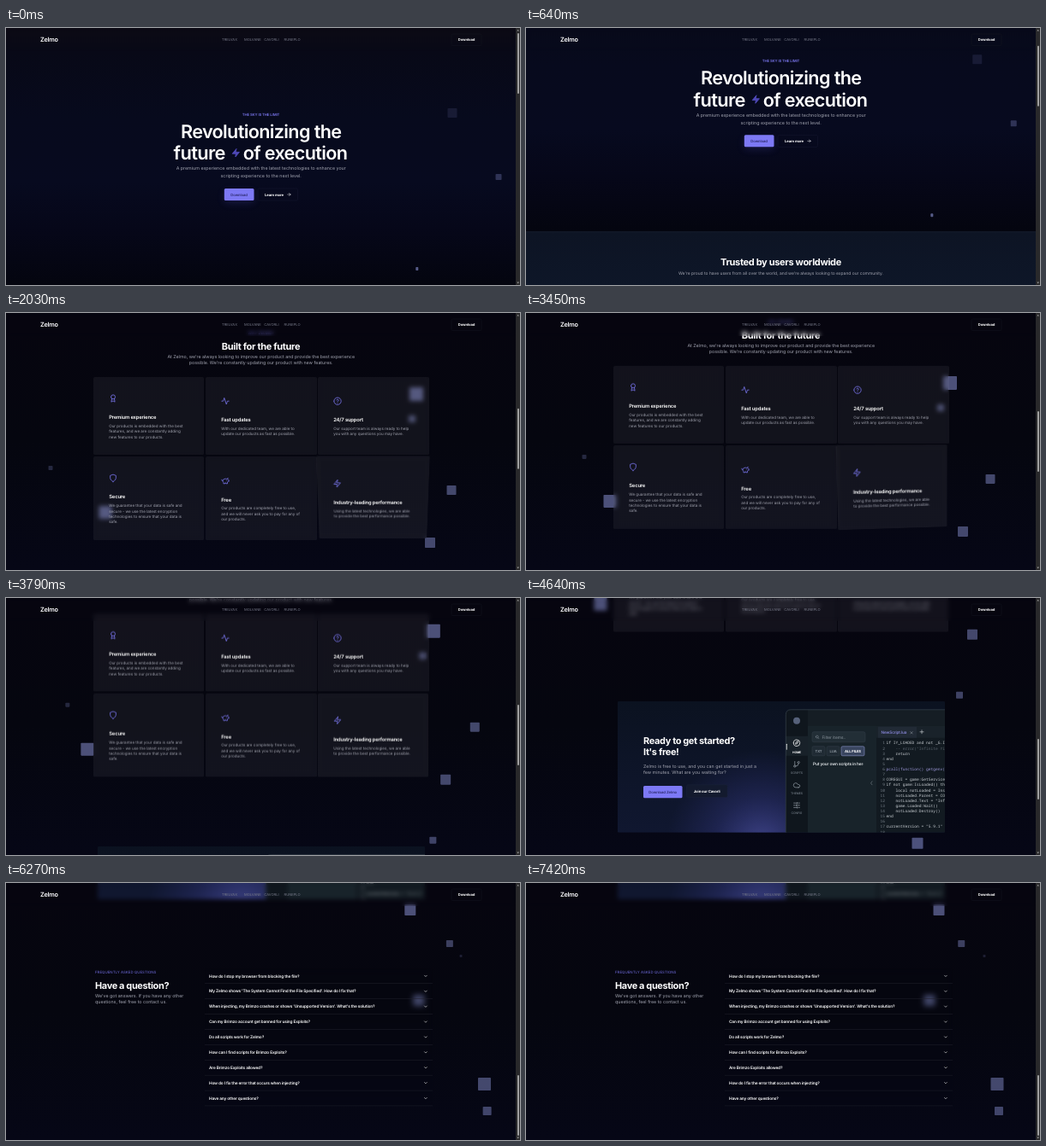
Write an HTML page that moves like this. It is 600 by 301 pixels and loops after 7.45 s.

```html
<!DOCTYPE html>
<html lang="en">
<head>
<meta charset="utf-8">
<title>Zelmo</title>
<style>
html, body { margin: 0; width: 100%; height: 100%; overflow: hidden; background: #05050f; }
#stage { position: relative; width: 600px; height: 301px; overflow: hidden; background: linear-gradient(#06050f, #05060f 50%, #060716); }
#page, #page > svg { position: absolute; left: 0; top: 0; width: 600px; height: 1234px; }
#page div { position: absolute; }
svg { display: block; overflow: visible; }
/* the minute turn switches glyphs to subpixel placement */
text { font-family: Inter, "Liberation Sans", sans-serif; white-space: pre; text-rendering: geometricPrecision; transform-box: fill-box; transform-origin: center; transform: rotate(.01deg); }
.display { letter-spacing: -.03em; }
.mono { font-family: "Noto Sans Mono", "DejaVu Sans Mono", monospace; }
.hero { top: 0; width: 600px; height: 301px; background: linear-gradient(#0c0a14, #080917 9%, #070a1d 35%, #070a1f 60%, #060719 78%, #04050f); }
.stats { top: 301px; width: 600px; height: 129px; box-sizing: border-box; background: linear-gradient(#0d1424, #0e1729 60%, #0d1728); border: solid #182135; border-width: .6px 0; }
.card { background: rgba(255, 255, 255, .055); border-radius: 1.5px; backdrop-filter: blur(2.5px); }
.faq { left: 232px; top: 1033px; width: 266px; height: 161px; backdrop-filter: blur(3px); }
#head { position: absolute; left: 0; top: 0; width: 595px; height: 27px; backdrop-filter: blur(2.5px); }
#head svg { width: 595px; height: 27px; }
#bar { position: absolute; left: 595px; top: 0; width: 5px; height: 301px; background: #29292b; }
#thumb { position: absolute; left: 1.7px; top: 6px; width: 2.3px; height: 70.5px; border-radius: 1.1px; background: #a0a0a0; }
</style>
</head>
<body>
<div id="stage">
  <div id="page"></div>
  <div id="head"></div>
  <div id="bar"><div id="thumb"></div></div>
</div>
<script>
const LOOP = 7450, MAX_SCROLL = 933;
const WHITE = '#fff', GREY = '#a2a4b0', INDIGO = '#7874ea', DARK = '#22205c';
const $ = id => document.getElementById(id);

// y is the middle of the capitals; heavier weights are set larger and tighter
const text = (x, y, size, fill, str, weight = 400, anchor = 'start', cls = '') => {
  if (weight >= 500) { size *= 1.05; cls = 'display'; }
  return `<text x="${x}" y="${y + size * .3635}" font-size="${size}" fill="${fill}" font-weight="${weight}" text-anchor="${anchor}" class="${cls}">${str}</text>`;
};
const mid = (x, y, size, fill, str, weight) => text(x, y, size, fill, str, weight, 'middle');
const rect = (x, y, w, h, fill, r = 0, stroke = 'none') =>
  `<rect x="${x}" y="${y}" width="${w}" height="${h}" rx="${r}" fill="${fill}" stroke="${stroke}" stroke-width=".5"/>`;
const path = (d, stroke, w = .6) =>
  `<path d="${d}" fill="none" stroke="${stroke}" stroke-width="${w}" stroke-linecap="round" stroke-linejoin="round"/>`;
// 24-unit icon centred on x, y
const icon = (x, y, size, d, stroke, fill = 'none') =>
  `<path transform="translate(${x - size / 2} ${y - size / 2}) scale(${size / 24})" d="${d}" fill="${fill}" stroke="${stroke}" stroke-width="2" stroke-linecap="round" stroke-linejoin="round"/>`;
const shift = (y, body) => `<g transform="translate(0 ${y})">${body}</g>`;

const ring = (x, y, r) => `M${x - r} ${y}a${r} ${r} 0 1 0 ${2 * r} 0a${r} ${r} 0 1 0 ${-2 * r} 0`;
const ICONS = {
  award: ring(12, 8, 6) + 'M15.5 13 17 22l-5-3-5 3 1.5-9',
  pulse: 'M22 12h-4l-3 9L9 3l-3 9H2',
  help: ring(12, 12, 10) + 'M9.1 9a3 3 0 0 1 5.8 1c0 2-3 3-3 3M12 17h.01',
  shield: 'M12 22s8-4 8-10V5l-8-3-8 3v7c0 6 8 10 8 10z',
  pig: 'M19 5c-1.5 0-2.8 1.4-3 2-3.5-1.5-11-.3-11 5 0 1.8 0 3 2 4.5V20h4v-2h3v2h4v-4c1-.5 1.7-1 2-2h2v-4h-2c0-1-.5-1.5-1-2zM2 9v1c0 1.1.9 2 2 2M16 11h.01',
  zap: 'M13 2 3 14h9l-1 8 10-12h-9z',
  compass: ring(12, 12, 10) + 'M16 8l-2 6-6 2 2-6z',
  branch: 'M6 3v12' + ring(18, 6, 3) + ring(6, 18, 3) + 'M18 9a9 9 0 0 1-9 9',
  cloud: 'M17.5 19H9a7 7 0 1 1 6.7-9h1.8a4.5 4.5 0 1 1 0 9z',
  sliders: 'M3 5h11M18 5h3M3 12h4M11 12h10M3 19h11M18 19h3M14 3v4M11 10v4M14 17v4',
  search: ring(11, 11, 7) + 'M16 16l5 5'
};

const hero = mid(297.5, 101, 4.1, INDIGO, 'THE SKY IS THE LIMIT', 600)
  + mid(297.7, 121, 20.6, WHITE, 'Revolutionizing the', 600)
  + text(195.6, 146.3, 20.8, WHITE, 'future', 600)
  + text(398.4, 146.3, 20.6, WHITE, 'of execution', 600, 'end')
  + icon(268.3, 146.3, 11, ICONS.zap, '#4f49b8', '#4f49b8')
  + mid(297.7, 164.3, 5.33, GREY, 'A premium experience embedded with the latest technologies to enhance your')
  + mid(297.7, 173.3, 5.33, GREY, 'scripting experience to the next level.')
  + `<g filter="url(#soft)" opacity=".2">${rect(254.8, 191, 34.7, 14, '#5a56d0', 3)}</g>`
  + rect(254.8, 188, 34.7, 14, '#7d79f5', 1.5) + mid(272, 195, 4.05, DARK, 'Download', 500)
  + rect(294, 188, 46.5, 14, 'none', 1.5, '#171930') + text(302, 195, 4, WHITE, 'Learn more', 700)
  + path('M328.8 195h3.4m-1.5-1.5 1.5 1.5-1.5 1.5', WHITE, .5);

const stats = mid(297.5, 87, 10.5, WHITE, 'Trusted by users worldwide', 700)
  + mid(297.5, 99.5, 4.95, GREY, "We're proud to have users from all over the world, and we're always looking to expand our community.")
  + [['10M+', 'Total downloads', 167], ['200K+', 'Cavorli members', 298], ['100M+', 'Times launched', 428.5]]
    .map(([n, label, x]) => mid(x, 128, 13.8, WHITE, n, 700) + mid(x, 145, 4.5, GREY, label)).join('');

const why = mid(297.5, 224, 4.5, '#5f5bc0', 'WHY <tspan fill="#7f7bea">ZELMO?</tspan>')
  + mid(297.5, 240, 10.5, WHITE, 'Built for the future', 700)
  + mid(297.7, 252.5, 5.3, GREY, "At Zelmo, we're always looking to improve our product and provide the best experience")
  + mid(297.7, 259.5, 5.3, GREY, "possible. We're constantly updating our product with new features.");

const CARDS = [
  ['award', 'Premium experience', 'Our products is embedded with the best|features, and we are constantly adding|new features to our products.'],
  ['pulse', 'Fast updates', 'With our dedicated team, we are able to|update our products as fast as possible.'],
  ['help', '24/7 support', 'Our support team is always ready to help|you with any questions you may have.'],
  ['shield', 'Secure', 'We guarantee that your data is safe and|secure - we use the latest encryption|technologies to ensure that your data is|safe.'],
  ['pig', 'Free', 'Our products are completely free to use,|and we will never ask you to pay for any of|our products.'],
  ['zap', 'Industry-leading performance', 'Using the latest technologies, we are able|to provide the best performance possible.']
];
const cardHtml = ([ico, title, desc], i) => {
  const row = i > 2 ? 1 : 0, x = 102 + (i % 3) * 131.2, y = row ? 619 : 526, h = row ? 98 : 91;
  const lines = desc.split('|'), top = h / 2 - 20.5 - (lines.length - 3) * 3.2;
  const body = icon(23, top, 10, ICONS[ico], INDIGO)
    + text(18.2, top + 22, 5.6, WHITE, title, 600)
    + lines.map((s, k) => text(18.2, top + 32.2 + k * 6.4, 4.55, GREY, s)).join('');
  return `<div class="card" id="card${i}" style="left:${x}px;top:${y}px;width:129.4px;height:${h}px"><svg width="129.4" height="${h}">${body}</svg></div>`;
};

const CODE = `if IY_LOADED and not _G.I
    -- error("Infinite Yi
    return
end

pcall(function() getgenv()

COREGUI = game:GetService
if not game:IsLoaded() th
    local notLoaded = Inst
    notLoaded.Parent = CO
    notLoaded.Text = "Inf
    game.Loaded:Wait()
    notLoaded:Destroy()
end

currentVersion = "5.9.1"
`.split('\n');
const codeFill = s => s.includes('--') ? '#59626c' : s.startsWith('pcall') ? '#9c97d8' : '#c9ced3';
const codeLines = CODE.map((s, i) => {
  const y = 170 + i * 6.125;
  return text(419, y, 4.5, '#78828b', i + 1, 400, 'end', 'mono') + text(420.5, y, 4.57, codeFill(s), s, 400, 'start', 'mono');
}).join('');
const SIDE = [['compass', 'HOME', 170, 180.5], ['branch', 'SCRIPTS', 195, 205], ['cloud', 'THEMES', 219.5, 228.5], ['sliders', 'CONFIG', 243, 252]];
const side = SIDE.map(([ico, label, y, ly], i) =>
  icon(316, y, 9, ICONS[ico], i ? '#8b959e' : WHITE) + mid(316, ly, 3.3, i ? '#727c86' : WHITE, label, i ? 500 : 700)).join('');
const chip = (x, w, label, on) => rect(x, 174, w, 11, on ? '#39455f' : '#202b34', 1.5, on ? '#9aa2dc' : '#34414b')
  + mid(x + w / 2, 179.5, 4, on ? WHITE : '#a6b0b8', label, on ? 700 : 500);

const editor = `<g clip-path="url(#win)">` + rect(303, 131, 186, 144, '#121a21')
  + rect(303, 131, 26, 144, '#0f161d') + rect(303, 162, 26, 23, '#182129')
  + rect(329, 131, 80, 144, '#18232a') + rect(329, 131, 160, 19, '#151d24')
  + rect(409, 150, 80, 14, '#19222a') + rect(411, 151, 45, 13, '#212a35')
  + `<circle cx="316" cy="144" r="4" fill="#56617a"/>` + rect(303.6, 171, 1, 7, WHITE, .5) + side
  + rect(334, 157, 62, 12, '#222e36', 2, '#34414b') + icon(340, 163, 5, ICONS.search, '#a6b0b8')
  + text(345.5, 163, 4.8, '#8d979f', 'Filter items..')
  + chip(334, 15, 'TXT') + chip(351, 15, 'LUA') + chip(368, 27, 'ALL FILES', true)
  + `<g clip-path="url(#list)">${text(335, 194, 4.6, '#e3e7ea', 'Put your own scripts in here', 600)}</g>`
  + path('M404 215l-1.5 2 1.5 2', '#8d979f', .5)
  + text(414.5, 158, 4.5, '#9290ea', 'NewScript.lua', 500)
  + path('M448.8 156.8l2.4 2.4m0-2.4-2.4 2.4', '#9aa3ab', .5) + path('M460 157h4m-2-2v4', '#d8dce0', .6)
  + codeLines + `</g>` + path('M303.3 275V137q0-6 6-6H489', '#37424c', .7);

const cta = `<g clip-path="url(#cta)">` + rect(107, 121, 382, 154, 'url(#navy)') + rect(107, 121, 382, 154, 'url(#glow)')
  + text(137, 167, 10.4, WHITE, 'Ready to get started?', 700) + text(137, 179.8, 10.4, WHITE, "It's free!", 700)
  + text(137, 197, 5.28, GREY, 'Zelmo is free to use, and you can get started in just a')
  + text(137, 204.3, 5.28, GREY, 'few minutes. What are you waiting for?')
  + rect(137, 220.3, 45.5, 14.2, '#7d79f5', 1.5) + mid(159.7, 227.4, 4.1, DARK, 'Download Zelmo', 500)
  + rect(187.5, 219, 47.5, 14.5, '#131a2e', 1.5, '#1b2338') + mid(211.2, 226.2, 4.1, WHITE, 'Join our Cavorli', 700)
  + editor + `</g>`;

const ASKED = ['How do I stop my browser from blocking the file?',
  "My Zelmo shows 'The System Cannot Find the File Specified'. How do I fix that?",
  "When injecting, my Brimzo crashes or shows 'Unsupported Version'. What's the solution?",
  'Can my Brimzo account get banned for using Exploits?', 'Do all scripts work for Zelmo?',
  'How can I find scripts for Brimzo Exploits?', 'Are Brimzo Exploits allowed?',
  'How do I fix the error that occurs when injecting?', 'Have any other questions?'];
const faq = text(104, 134, 4.4, '#6f6bdc', 'FREQUENTLY ASKED QUESTIONS')
  + text(104, 149.8, 10.4, WHITE, 'Have a question?', 700)
  + text(104, 162, 5.3, GREY, "We've got answers. If you have any other")
  + text(104, 169.5, 5.3, GREY, 'questions, feel free to contact us.')
  + ASKED.map((q, i) => {
    const y = 138.8 + i * 17.9;
    return text(237, y, 4.55, WHITE, q, 600) + path(`M488.5 ${y - .6}l1.4 1.4 1.4-1.4`, WHITE, .55)
      + rect(232, y + 8.7, 266, .5, '#20212c');
  }).join('');

const defs = `<defs>
  <linearGradient id="navy" x2="0" y2="1"><stop stop-color="#0b1220"/><stop offset="1" stop-color="#101730"/></linearGradient>
  <radialGradient id="glow" gradientUnits="userSpaceOnUse" cx="275" cy="288" r="110">
    <stop stop-color="#5559b0" stop-opacity=".68"/><stop offset=".5" stop-color="#4145a0" stop-opacity=".28"/><stop offset="1" stop-color="#393c90" stop-opacity="0"/>
  </radialGradient>
  <filter id="soft" x="-1" y="-2" width="3" height="5"><feGaussianBlur stdDeviation="5"/></filter>
  <clipPath id="cta"><rect x="107" y="121" width="382" height="154" rx="1.5"/></clipPath>
  <clipPath id="win"><rect x="303" y="131" width="210" height="170" rx="6"/></clipPath>
  <clipPath id="list"><rect x="334" y="188" width="59.5" height="12"/></clipPath>
</defs>`;

// drifting squares: page y, size, opacity, then [time, x] points
const SQUARES = [
  [99, 11, .13, [0, 521], [1000, 530]], [174, 7, .3, [0, 575], [1000, 566]],
  [282, 3.4, .6, [0, 480], [1180, 469]],
  [546, 16, .52, [1180, 466], [2030, 479], [3450, 495]],
  [575, 8, .46, [2030, 474], [3450, 484]], [658, 11, .46, [2030, 520], [3450, 542]],
  [720, 12, .46, [2030, 495], [3450, 510], [4640, 521]],
  [684, 15, .52, [2030, 116], [3450, 98], [4640, 87]],
  [632, 5, .24, [2030, 52], [3450, 68]], [791, 8, .42, [4640, 506], [5640, 515]],
  [964, 13, .52, [4640, 457], [5390, 464], [7420, 482]],
  [1004, 7.5, .4, [5390, 525], [7420, 508]], [1168, 15, .46, [5390, 565], [7420, 550]],
  [1200, 10, .44, [5390, 569], [7420, 552]], [1070, 13, .44, [5390, 490], [7420, 471]],
  [1018, 3, .18, [5390, 528], [7420, 535]]
];

$('page').innerHTML = '<div class="hero"></div><div class="stats"></div>'
  + SQUARES.map(([y, s, a]) => `<div class="sq" style="top:${y - s / 2}px;width:${s}px;height:${s}px;border-radius:.8px;background:rgba(142,150,216,${a})"></div>`).join('')
  + CARDS.map(cardHtml).join('') + '<div class="faq"></div>'
  + `<svg>${defs}${hero}${shift(250, stats + why)}${shift(677, cta)}${shift(903, faq)}</svg>`;

const NAV = [['TRELVAX', 252], ['MOLVANE', 278], ['CAVORLI', 301.3], ['RUNEPLO', 324.5]];
$('head').innerHTML = '<svg>' + text(40, 13.7, 6.9, WHITE, 'Zelmo', 600)
  + NAV.map(([s, x]) => text(x, 13.8, 4.1, '#767988', s)).join('')
  + rect(520, 7, 35, 13.6, 'none', 1.5, '#171823') + mid(537.6, 13.7, 4, WHITE, 'Download', 700) + '</svg>';
$('bar').insertAdjacentHTML('beforeend', '<svg width="5" height="301"><path d="M1.5 3.6h2.4L2.7 1.8zM1.5 297.6h2.4l-1.2 1.8z" fill="#a0a0a0"/></svg>');

const segment = (pts, t) => {
  let i = 0;
  while (i < pts.length - 2 && t >= pts[i + 1][0]) i++;
  return i;
};
const slope = (a, b) => (b[1] - a[1]) / (b[0] - a[0]);
const lerp = (pts, t) => {
  const i = segment(pts, t), a = pts[i];
  return a[1] + slope(a, pts[i + 1]) * (t - a[0]);
};
// monotone cubic through the points
const smooth = (pts, t) => {
  const tangent = k => {
    if (!k || k === pts.length - 1) return 0;
    const m = slope(pts[k - 1], pts[k]), n = slope(pts[k], pts[k + 1]);
    return m * n > 0 ? 2 * m * n / (m + n) : 0;
  };
  const i = segment(pts, t), a = pts[i], b = pts[i + 1], h = b[0] - a[0], u = (t - a[0]) / h;
  const e = u * u * (3 - 2 * u);
  return a[1] + (b[1] - a[1]) * e + h * u * (1 - u) * ((1 - u) * tangent(i) - u * tangent(i + 1));
};

const SCROLL = [[0, 0], [300, 0], [1180, 250], [2030, 451], [3250, 451], [3450, 464], [4640, 677], [5390, 903], [6150, MAX_SCROLL], [LOOP, MAX_SCROLL]];
const TILT_X = [[0, 0], [1650, 0], [1950, -10], [2030, -10], [3450, -4], [3800, 0], [LOOP, 0]];
const TILT_Y = [[0, 0], [2030, 0], [3450, 5], [3800, 0], [LOOP, 0]];
const TILT_Z = [[0, 0], [2030, 0], [3450, -.7], [3800, 0], [LOOP, 0]];

const squares = [...document.querySelectorAll('.sq')];
const start = performance.now();

function draw() {
  const t = (performance.now() - start) % LOOP, y = smooth(SCROLL, t);
  $('page').style.transform = `translateY(${-y}px)`;
  $('thumb').style.transform = `translateY(${y / MAX_SCROLL * 219}px)`;
  squares.forEach((el, i) => {
    const [, size, , ...pts] = SQUARES[i];
    el.style.transform = `translateX(${lerp(pts, t) - size / 2}px)`;
  });
  $('card5').style.transform = `perspective(312px) rotateX(${smooth(TILT_X, t)}deg) rotateY(${smooth(TILT_Y, t)}deg) rotateZ(${smooth(TILT_Z, t)}deg)`;
  requestAnimationFrame(draw);
}
draw();
</script>
</body>
</html>
```
